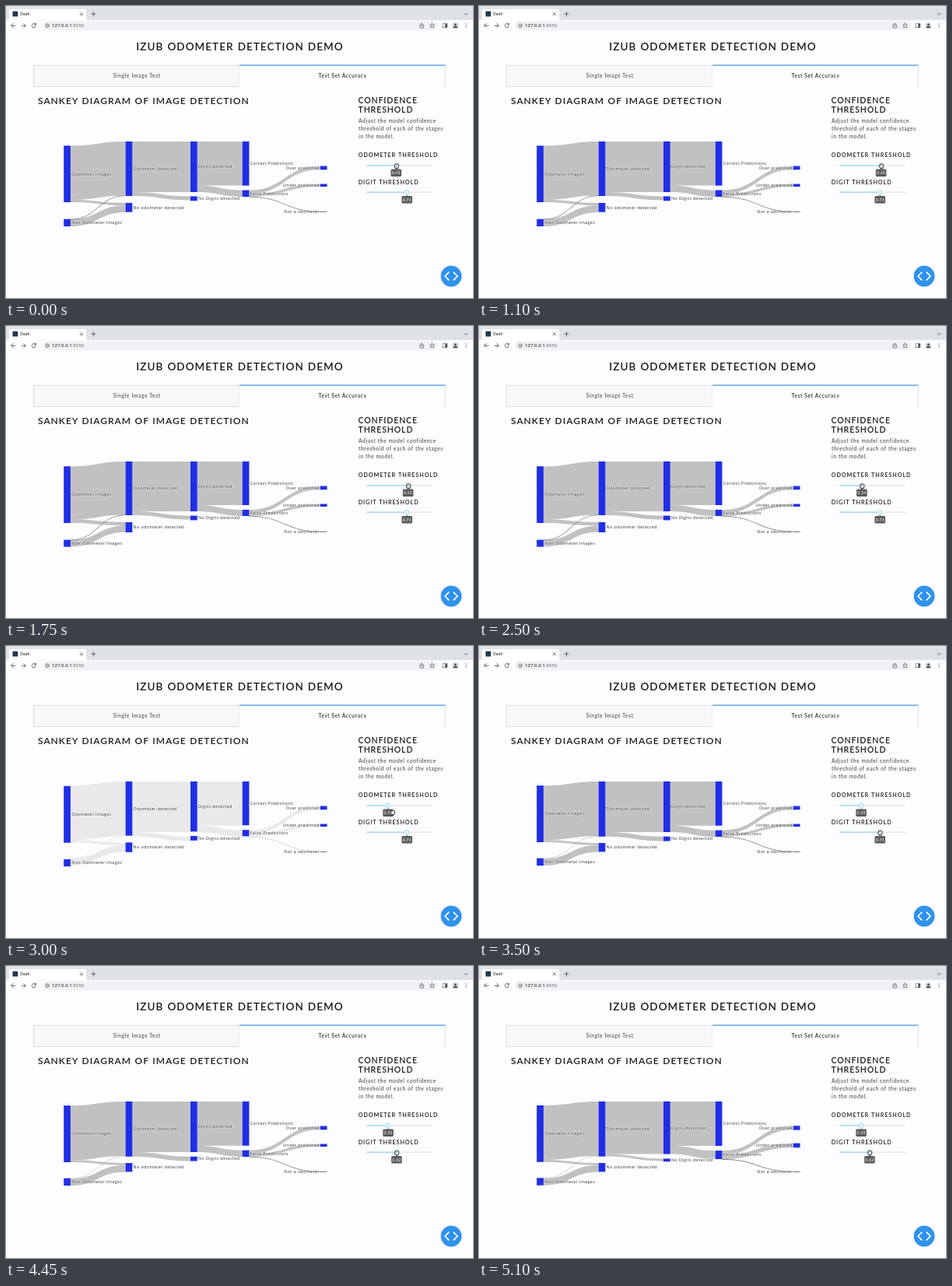
An HTML page for the animation above (5150 ms loop, 600 by 375 pixels).

```html
<!DOCTYPE html>
<html lang="en">
<head>
<meta charset="utf-8">
<title>Dash</title>
<style>
  html, body { margin: 0; width: 100%; height: 100%; overflow: hidden; background: #fdfcfe; }
  svg { display: block; width: 600px; height: 375px; }
  text { font-family: Lato, "Open Sans", sans-serif; fill: #1c1c20; }
  .mid { text-anchor: middle; }
  .head { font-weight: 600; word-spacing: .6px; }
  .body { font-size: 6.6px; letter-spacing: .6px; fill: #4a4a4e; word-spacing: .2px; font-weight: 500; }
  .tab { font-size: 6.6px; letter-spacing: .65px; font-weight: 500; text-anchor: middle; }
  .label {
    font: 5.3px "Open Sans", "Noto Sans", sans-serif; letter-spacing: .45px; fill: #2a3036;
    paint-order: stroke; stroke: rgba(255, 255, 255, .6); stroke-width: 1px; stroke-linejoin: round;
  }
  .tip { font-size: 5.2px; letter-spacing: .2px; fill: #fff; text-anchor: middle; }
  .chrome { font-family: Roboto, sans-serif; }
  .icon { fill: none; stroke: #55585d; stroke-width: .9; stroke-linecap: round; stroke-linejoin: round; }
</style>
</head>
<body>
<svg id="stage" viewBox="0 0 600 375">
  <!-- browser frame -->
  <rect width="600" height="18.5" fill="#dee1e6"/>
  <path d="M1 18.5Q4 18.5 4 15.500V7Q4 4 7 4H100Q103 4 103 7V15.500Q103 18.500 106 18.500Z" fill="#fff"/>
  <rect y="18" width="600" height="15" fill="#fff"/>
  <rect x="8.500" y="6.800" width="6.800" height="6.800" rx=".6" fill="#28344f"/>
  <text class="chrome" x="18.300" y="12.400" font-size="5.400">Dash</text>
  <g class="icon">
    <path d="M95.200 8.700l3.400 3.400m0-3.400l-3.400 3.400M109.800 10.300h5.200m-2.600-2.600v5.200M589 9.500l2 2 2-2"/>
    <path d="M12.200 25.200H6.800m2.600-2.600l-2.600 2.600 2.600 2.600M20 25.200h5.400m-2.600-2.600l2.600 2.600-2.600 2.600"/>
    <path d="M38 23.500a2.600 2.600 0 1 0 .5 2.200M38.400 22.200v1.800h-1.800"/>
  </g>
  <rect x="46" y="19.300" width="509" height="11.800" rx="5.900" fill="#f0f1f4"/>
  <circle cx="53" cy="25.200" r="2.300" class="icon" style="stroke-width:.7"/>
  <path d="M53 24.800v1.500M53 23.800v.1" class="icon" style="stroke-width:.7"/>
  <text class="chrome" x="59" y="27.400" font-size="6.200">127.0.0.1<tspan fill="#777a7f">:8050</tspan></text>
  <g class="icon" style="stroke-width:.7">
    <path d="M532.800 24.500h-1v3.500h4.800v-3.500h-1M534.200 26v-3.800m-1.300 1.200l1.300-1.300 1.300 1.300"/>
    <path d="M547.500 22.200l.9 1.900 2.100.3-1.500 1.500.4 2.100-1.900-1-1.900 1 .4-2.100-1.500-1.500 2.100-.3z"/>
    <rect x="561.500" y="22.700" width="5.200" height="5"/>
  </g>
  <rect x="564.300" y="22.700" width="2.400" height="5" fill="#44474c"/>
  <circle cx="577.400" cy="25.200" r="4" fill="#d6d8dc"/>
  <circle cx="577.400" cy="23.800" r="1.400" fill="#44474c"/>
  <path d="M574.700 27.900a2.700 2.200 0 0 1 5.400 0z" fill="#44474c"/>
  <path d="M591 22.900v.1m0 2.100v.1m0 2.100v.1" class="icon" style="stroke-width:1.200"/>

  <text class="head mid" x="300.500" y="57" font-size="13.500" letter-spacing="1.05">IZUB ODOMETER DETECTION DEMO</text>

  <!-- tabs -->
  <rect x="35.500" y="76.300" width="264.500" height="27" fill="#f8f7fa" stroke="#d8d8dc" stroke-width=".8"/>
  <rect x="300" y="76" width="264.500" height="27.600" fill="#fefdff"/>
  <path d="M564.300 76V103.300" stroke="#d8d8dc" stroke-width=".8"/>
  <path d="M300 76.100H564.600" stroke="#3c9be6" stroke-width="1.300"/>
  <text class="tab" x="168.300" y="92" fill="#444" style="fill:#4a4a4e">Single Image Test</text>
  <text class="tab" x="432.500" y="92.200">Test Set Accuracy</text>

  <text class="head" x="41" y="126" font-size="12" letter-spacing="1">SANKEY DIAGRAM OF IMAGE DETECTION</text>
  <g class="head" font-size="10.500" letter-spacing=".9">
    <text x="452.500" y="125">CONFIDENCE</text>
    <text x="452.500" y="136.800">THRESHOLD</text>
  </g>
  <text class="body" x="453" y="149.700">Adjust the model confidence</text>
  <text class="body" x="453" y="159.800">threshold of each of the stages</text>
  <text class="body" x="453" y="169.800">in the model.</text>
  <g class="head" font-size="7.200" letter-spacing=".93">
    <text x="452.700" y="194.300">ODOMETER THRESHOLD</text>
    <text x="452.700" y="229.300">DIGIT THRESHOLD</text>
  </g>

  <g id="links"></g>
  <g id="nodes"></g>
  <g id="sliders"></g>

  <circle cx="572" cy="347" r="13.400" fill="#2f92ec"/>
  <path d="M568.800 342.200l-4.800 4.800 4.800 4.800M575.200 342.200l4.800 4.800-4.800 4.800" fill="none" stroke="#fff"
    stroke-width="1.700" stroke-linecap="round" stroke-linejoin="round"/>
  <path id="cursor" d="M-1.900 3.200L-3 .8Q-3.200-.6-2-.4V-1.800Q-1.700-2.800-.9-2.200Q-.3-3-.1-2.300Q.8-2.900 1.100-2Q2.200-2.300 2.500-1.200V1.200L1.800 3.200Z"
    fill="#d9dde0" stroke="#26292c" stroke-width=".9" stroke-linejoin="round"/>
</svg>
<script>
const LOOP = 5150, STEP = 50, FADE = 500, THIN = .6;
const NODE_W = 8.7;
const $ = id => document.getElementById(id);

function add(parent, tag, attrs = {}, text = '') {
  const el = document.createElementNS('http://www.w3.org/2000/svg', tag);
  for (const k in attrs) el.setAttribute(k, attrs[k]);
  el.textContent = text;
  parent.append(el);
  return el;
}

const nodeDefs = [
  ['Odometer Images', 74.2], ['Non-Odometer Images', 74.2],
  ['Odometer detected', 153.6], ['No odometer detected', 153.6],
  ['Digits detected', 237], ['No Digits detected', 237],
  ['Correct Predictions', 303.7], ['False Predictions', 303.7],
  ['Over predicted', 403.8], ['Under predicted', 403.8], ['Not a odometer', 403.8]
];

// Each state: start time, opacity of the thin upper link, then top and bottom of every node.
const states = [
  [-FADE, 1, [179.4, 252, 273.6, 283, 174, 244, 252.9, 264.6, 174, 239, 244.4, 250.2,
    174, 230.6, 236.5, 245, 205.5, 210.3, 228.5, 232.1, 263.7, 264.7]],
  [1200, 1, [180.2, 253, 274.6, 283.6, 174, 243, 252, 265, 174, 238, 243.6, 249.4,
    174, 230, 236, 244, 205.5, 210.2, 228.5, 232, 263.7, 264.7]],
  [2780, .35, [179.2, 252, 272.6, 282, 174, 244.7, 253, 264.3, 174, 239, 244.7, 250.5,
    174, 230.7, 236.6, 245, 205.5, 210.3, 228.5, 232.1, 263.7, 264.7]],
  [4550, .35, [179, 251.7, 272.2, 281.7, 174, 244.6, 253, 264.3, 174, 241.5, 247.4, 251.2,
    174, 231, 237.1, 248, 205.2, 210.6, 227.6, 233.2, 263.7, 264.7]]
];

// Source, target, thickness as a function of node heights.
const linkDefs = [
  [0, 2, h => h[2] - THIN], [0, 3, h => h[0] - h[2] + THIN],
  [1, 2, () => THIN], [1, 3, h => h[1] - THIN],
  [2, 4, h => h[4]], [2, 5, h => h[2] - h[4]],
  [4, 6, h => h[6]], [4, 7, h => h[4] - h[6]],
  [7, 8, h => h[8]], [7, 9, h => h[9]], [7, 10, () => THIN]
];

const links = linkDefs.map(([from, to]) => {
  const thin = (from === 1 && to === 2) || to === 10;
  return add($('links'), 'path', thin
    ? { fill: '#77777b', stroke: '#88888c', 'stroke-width': .25 }
    : { fill: '#000', 'fill-opacity': .235 });
});

const nodes = nodeDefs.map(([name, x], i) => {
  const left = i > 7;
  return {
    box: add($('nodes'), 'rect', { x, width: NODE_W, fill: i === 10 ? '#66666e' : '#202ee6' }),
    label: add($('nodes'), 'text', {
      class: 'label', x: left ? x - 1 : x + NODE_W + 1.3, 'text-anchor': left ? 'end' : 'start'
    }, name)
  };
});

function drawLinks(ys, thinAlpha) {
  const h = nodeDefs.map((_, i) => ys[2 * i + 1] - ys[2 * i]);
  const out = nodeDefs.map((_, i) => ys[2 * i]);
  const into = out.slice();
  linkDefs.forEach(([a, b, size], i) => {
    const s = size(h), x0 = nodeDefs[a][1] + NODE_W, x1 = nodeDefs[b][1], m = (x0 + x1) / 2;
    const p = out[a], q = into[b];
    out[a] += s;
    into[b] += s;
    links[i].setAttribute('d',
      `M${x0} ${p}C${m} ${p} ${m} ${q} ${x1} ${q}V${q + s}C${m} ${q + s} ${m} ${p + s} ${x0} ${p + s}Z`);
  });
  links[2].setAttribute('opacity', thinAlpha);
}

function drawSankey(t) {
  let n = 0;
  while (n + 1 < states.length && t >= states[n + 1][0]) n++;
  const [start, thinAlpha, ys] = states[n];
  const k = cubic(Math.min(1, (t - start) / FADE));
  const prev = states[Math.max(0, n - 1)][2];
  drawLinks(ys, thinAlpha);
  $('links').setAttribute('opacity', k);
  nodes.forEach(({ box, label }, i) => {
    const [top, bottom] = [2 * i, 2 * i + 1].map(j => prev[j] + (ys[j] - prev[j]) * k);
    box.setAttribute('y', top);
    box.setAttribute('height', bottom - top);
    label.setAttribute('y', (top + bottom) / 2 + 1.8);
  });
}

const LEFT = 463, RIGHT = 548;

function makeSlider(y, min) {
  const g = $('sliders');
  const line = { y: y - .8, x: LEFT, height: 1.6, rx: .8 };
  add(g, 'rect', { ...line, width: RIGHT - LEFT, fill: '#e7e7ea' });
  const fill = add(g, 'rect', { ...line, fill: '#a5def2' });
  const knob = add(g, 'g');
  add(knob, 'circle', { cy: y, r: 2.6, fill: '#fff', stroke: '#8fd6f3', 'stroke-width': 1 });
  add(knob, 'path', { d: `M-1.500 ${y + 5}L0 ${y + 3.600}L1.500 ${y + 5}Z`, fill: '#5b5b5e' });
  add(knob, 'rect', { x: -6.8, y: y + 4.8, width: 13.6, height: 9.6, rx: 1.6, fill: '#5b5b5e' });
  const text = add(knob, 'text', { class: 'tip', y: y + 11.5 });
  return value => {
    const x = LEFT + (RIGHT - LEFT) * (value - min) / (1 - min);
    fill.setAttribute('width', x - LEFT);
    knob.setAttribute('transform', `translate(${x})`);
    text.textContent = value.toFixed(2);
  };
}

const setOdometer = makeSlider(204.7, 0);
const setDigit = makeSlider(239.2, .3);

const odometerKeys = [[0, .45], [150, .45], [950, .63], [1850, .63], [2480, .34], [2650, .33]];
const digitKeys = [[0, .73], [3600, .73], [4080, .62]];
const cursorX = [[0, 502], [150, 502], [950, 517.3], [1850, 517.3], [2480, 492.5], [2650, 491.5],
  [2750, 491.5], [3000, 497], [3500, 515.5], [3600, 515.5], [4080, 502.2]];
const cursorY = [[0, 205.2], [2750, 205.2], [3000, 213.5], [3500, 239.5]];

function cubic(p) {
  return p < .5 ? 4 * p ** 3 : 1 - 4 * (1 - p) ** 3;
}

function at(keys, t) {
  const i = keys.findIndex(k => k[0] > t);
  if (i < 0) return keys[keys.length - 1][1];
  const [t0, a] = keys[i - 1], [t1, b] = keys[i];
  const p = (t - t0) / (t1 - t0);
  return a + (b - a) * p * p * (3 - 2 * p);
}

function draw(t) {
  drawSankey(t);
  setOdometer(at(odometerKeys, t));
  setDigit(at(digitKeys, t));
  $('cursor').setAttribute('transform', `translate(${at(cursorX, t)} ${at(cursorY, t)})`);
}

const begin = performance.now();
function tick() {
  const t = (performance.now() - begin) % LOOP;
  draw(Math.floor(t / STEP) * STEP);
  requestAnimationFrame(tick);
}
tick();
</script>
</body>
</html>
```
